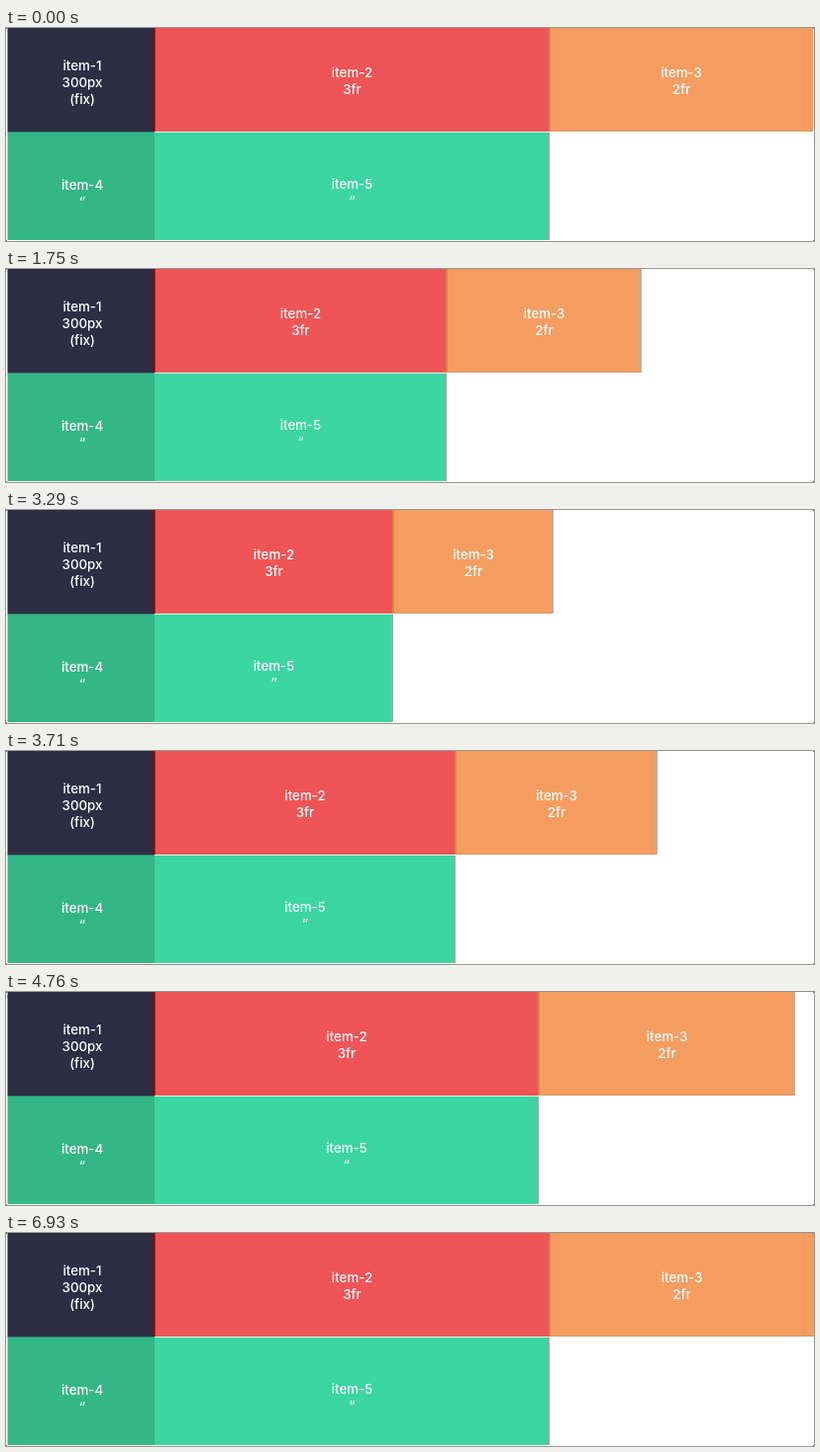
An HTML page with a canvas that plays this animation: 816 px wide and 216 px high, repeating every 7000 ms.

```html
<!DOCTYPE html>
<html lang="en">
<head>
<meta charset="utf-8">
<title>Grid columns: fixed, 3fr, 2fr</title>
<style>
html, body { margin: 0; width: 100%; height: 100%; overflow: hidden; background: #fff; }
canvas { display: block; width: 816px; height: 216px; }
</style>
</head>
<body>
<canvas id="stage" width="816" height="216"></canvas>
<script>
const ctx = document.getElementById('stage').getContext('2d');
const W = 816, H = 216, LOOP = 7000, STEP = 70;
const LEFT = 1.5, FIXED = 150, ROW1 = 105, ROW2 = 106, BOTTOM = 215;

// Dragged right edge of the grid: [time, x]
const drag = [
  [0, 815], [800, 815], [1260, 737], [1470, 690], [2240, 573], [2800, 513],
  [3290, 553], [3780, 672], [4130, 715], [4550, 769], [5000, 815], [6100, 815], [6160, 816], [LOOP, 816]
];

const slope = i => (drag[i + 1][1] - drag[i][1]) / (drag[i + 1][0] - drag[i][0]);

// Monotone tangent: the harmonic mean of the neighbouring slopes
function tangent(i) {
  if (i === 0 || i === drag.length - 1) return 0;
  const a = slope(i - 1), b = slope(i);
  return a * b > 0 ? 2 * a * b / (a + b) : 0;
}

function rightEdge(t) {
  let i = 0;
  while (i < drag.length - 2 && t >= drag[i + 1][0]) i++;
  const [t0, x0] = drag[i], [t1, x1] = drag[i + 1];
  const h = t1 - t0, u = (t - t0) / h, v = 1 - u;
  return x0 * v * v * (1 + 2 * u) + x1 * u * u * (3 - 2 * u)
    + h * u * v * (tangent(i) * v - tangent(i + 1) * u);
}

function box(color, x0, y0, x1, y1) {
  ctx.fillStyle = color;
  ctx.fillRect(x0, y0, x1 - x0, y1 - y0);
}

function label(x, baseline, ...lines) {
  ctx.fillStyle = '#fff';
  lines.forEach((line, i) => ctx.fillText(line, x, baseline + i * 17));
}

function draw(t) {
  const right = Math.round(rightEdge(t));
  const mid = Math.round(FIXED + (right - FIXED) * 0.6 - 0.4);

  box('#fff', 0, 0, W, H);
  box('#2d2e44', LEFT, 0, FIXED, ROW1);
  box('#ef5557', FIXED, 0, mid, ROW1);
  box('#7c0c14', FIXED - 2, 0, FIXED, ROW1);
  box('#c0181c', FIXED, 0, FIXED + 1, ROW1);
  box('#f59d61', mid, 0, right, ROW1);
  box('#cd8b40', mid - 1, 0, mid + 1, ROW1);
  box('#d9955f', mid, ROW1 - 1, right, ROW1);
  if (right < W - 1) box('#b5b0af', right - 2, 0, right, ROW1);

  box('#2f7f70', LEFT, ROW1, FIXED, ROW2);
  box('#d5f7ea', FIXED, ROW1, mid, ROW2);
  box('#33b787', LEFT, ROW2, FIXED, BOTTOM);
  box('#3bd5a1', FIXED, ROW2, mid, BOTTOM);
  box('#a3a3a0', mid - 2, ROW2, mid, BOTTOM);
  box('#8fe9df', 1, ROW2, 2, BOTTOM);

  for (const x of [0, W - 1])
    for (const y of [0, H - 1]) box('#777', x, y, x + 1, y + 1);

  ctx.font = '500 13.3px Inter, "Liberation Sans", sans-serif';
  ctx.textAlign = 'center';
  const x1 = 77, x2 = (FIXED + mid) / 2, x3 = (mid + right) / 2;
  label(x1, 43, 'item-1', '300px', '(fix)');
  label(x2, 50, 'item-2', '3fr');
  label(x3, 50, 'item-3', '2fr');
  label(x1, 163.5, 'item-4', '“');
  label(x2, 162.5, 'item-5', '“');
}

const start = performance.now();
function tick() {
  const t = (performance.now() - start) % LOOP;
  draw(Math.floor(t / STEP) * STEP);
  requestAnimationFrame(tick);
}
tick();
</script>
</body>
</html>
```
